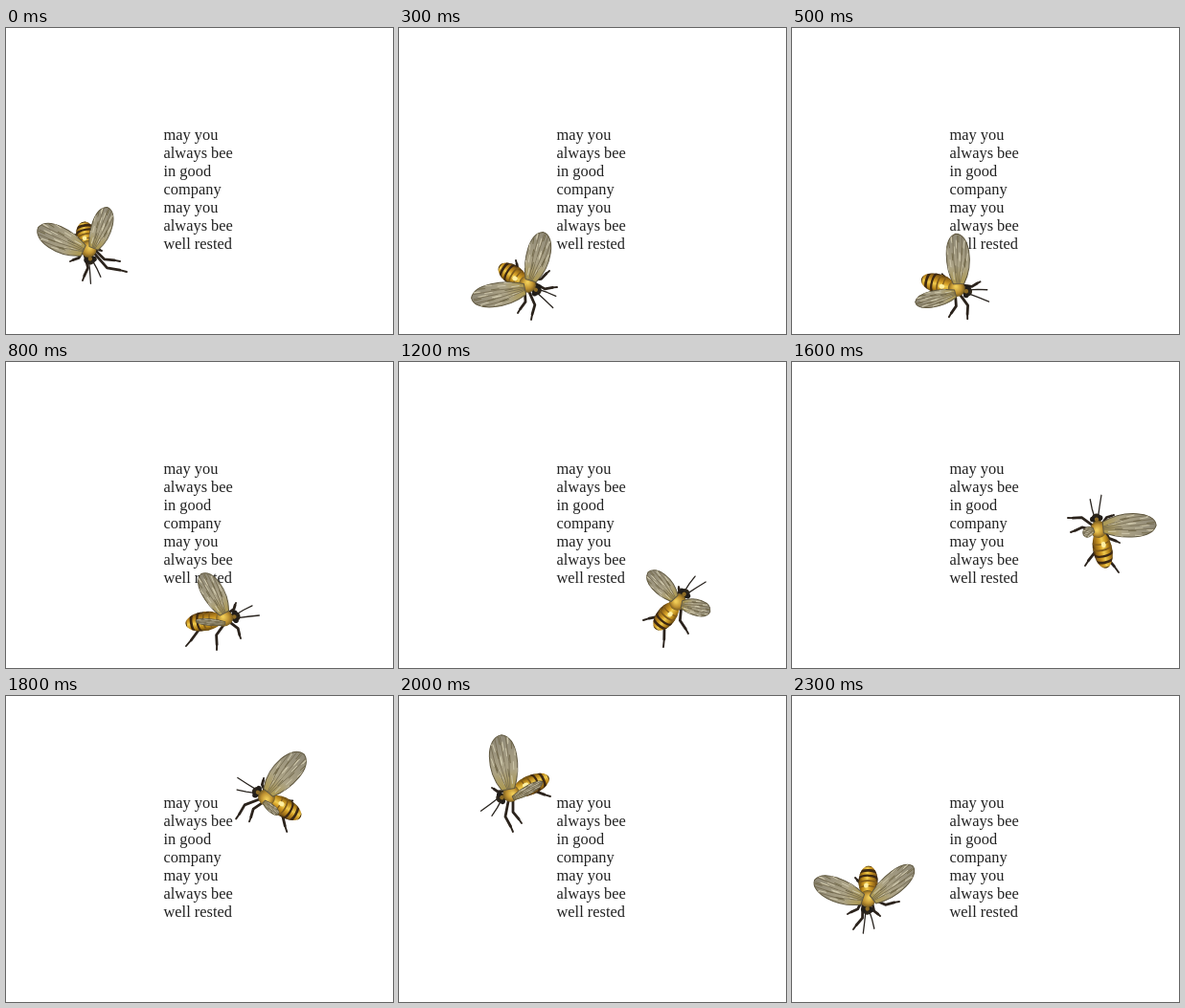
An HTML page with a canvas for the animation above (2400 ms loop, 404 by 320 pixels).

```html
<!DOCTYPE html>
<html lang="en">
<head>
<meta charset="utf-8">
<title>Bee</title>
<style>
html, body { margin: 0; width: 100%; height: 100%; overflow: hidden; background: #fff; }
p, canvas { position: absolute; margin: 0; }
p { left: 164.5px; top: 102px; font: 16.4px/19px "Liberation Serif", "Times New Roman", serif; color: #222; white-space: nowrap; }
canvas { left: 0; top: 0; }
</style>
</head>
<body>
<p>may you<br>always bee<br>in good<br>company<br>may you<br>always bee<br>well rested</p>
<canvas id="c" width="404" height="320"></canvas>
<script>
const ctx = document.getElementById('c').getContext('2d');
const STEPS = 24, STEP_MS = 100, RAD = Math.PI / 180;

// thorax path: step, x, y
const path = [
  [0, 86, 231], [3, 134, 268], [6, 191, 272], [8, 228, 268], [12, 291, 251], [16, 320, 175],
  [18, 272, 106], [19, 198, 80], [20, 117, 102], [22, 79, 176], [23, 79, 212]
];
// heading on top of an even anticlockwise turn: step, degrees
const lean = [[0, 74], [3, 77], [8, 102], [12, 136], [16, 147], [20, 72], [23, 70]];

// offsets from the thorax; wings are x, y, width (left, right)
const tails = [[-5, -28], [-29, -19], [-40, 6], [-23, 28], [8, 40], [39, -17], [1, -34]];
const wings = [
  [21, -43, 19, -53, -21, 23], [18, -54, 22, -58, 16, 22], [-23, -47, 20, -30, 3, 6],
  [-30, -32, 18, 34, 9, 15], [-16, 5, 9, 60, -6, 22], [33, -12, 8, -12, -61, 26],
  [48, -33, 20, -56, -18, 22]
];
// feet: front, middle, hind on the left, then on the right
const feet = [
  [40, 24, 33, 13, 14, 2, -6, 33, -19, 13, -14, -15],
  [31, 3, 23, -14, -12, -25, 4, 37, -10, 30, -10, 10],
  [12, -16, 0, -8, -8, -6, 17, 21, -8, 33, -40, 29],
  [1, -16, -8, -4, -36, 19, 24, 3, 11, 33, -15, 47],
  [-32, -12, -29, 3, -14, 38, 16, -15, 22, 14, 21, 45],
  [2, 40, 11, 31, 41, 3, -20, -6, 0, 0, 8, -4],
  [13, 18, 33, 3, 10, -5, -15, 32, -21, 16, -13, -22]
];

const heading = (step, v) => (v - step * 360 / STEPS) * RAD;
const turn = ([x, y], a) => [
  x * Math.cos(a) - y * Math.sin(a),
  x * Math.sin(a) + y * Math.cos(a)
];

// poses stored relative to the heading
const poses = lean.map(([step, deg], i) => {
  const a = -heading(step, deg), w = wings[i], f = feet[i], row = [step, deg];
  row.push(...turn(tails[i], a));
  for (const k of [0, 3]) row.push(...turn([w[k], w[k + 1]], a), w[k + 2]);
  for (let k = 0; k < 12; k += 2) row.push(...turn([f[k], f[k + 1]], a));
  return row;
});

// periodic cubic through rows of [step, ...values]
function sample(rows, s) {
  const n = rows.length;
  const key = i => rows[(i + n) % n];
  const when = i => key(i)[0] + Math.floor(i / n) * STEPS;
  let i = n - 1;
  while (rows[i][0] > s) i--;
  const h = when(i + 1) - when(i), u = (s - when(i)) / h;
  const slope = (j, k) => (key(j + 1)[k] - key(j - 1)[k]) / (when(j + 1) - when(j - 1));
  const b = u * u * (3 - 2 * u);
  return key(i).slice(1).map((v, j) => {
    const k = j + 1;
    return v * (1 - b) + key(i + 1)[k] * b
      + h * u * (1 - u) * ((1 - u) * slope(i, k) - u * slope(i + 1, k));
  });
}

function line(points, width, color) {
  ctx.beginPath();
  points.forEach(p => ctx.lineTo(p[0], p[1]));
  ctx.lineWidth = width;
  ctx.strokeStyle = color;
  ctx.stroke();
}

function oval(x, y, rx, ry, fill) {
  ctx.beginPath();
  ctx.ellipse(x, y, rx, ry, 0, 0, 7);
  ctx.fillStyle = fill;
  ctx.fill();
}

function leg(hip, foot, side) {
  const dx = foot[0] - hip[0], dy = foot[1] - hip[1];
  const bend = 0.17 * side * (foot[0] < -4 ? -1 : 1);
  const knee = [hip[0] + dx * 0.5 + dy * bend, hip[1] + dy * 0.5 - dx * bend];
  const ankle = [hip[0] + dx * 0.82 + dy * bend * 0.3, hip[1] + dy * 0.82 - dx * bend * 0.3];
  line([hip, knee, ankle], 2.8, '#2b231c');
  line([ankle, foot], 1.9, '#2b231c');
}

function abdomen(tx, ty) {
  const len = Math.hypot(tx, ty), rx = len * 0.48, ry = 10;
  ctx.save();
  ctx.rotate(Math.atan2(ty, tx));
  ctx.translate(len * 0.53, 0);
  const g = ctx.createLinearGradient(0, -ry, 0, ry);
  [[0, '#59400f'], [0.2, '#b98619'], [0.45, '#f0cb4e'], [0.6, '#d39d25'], [0.85, '#936616'], [1, '#392611']]
    .forEach(([at, c]) => g.addColorStop(at, c));
  oval(0, 0, rx, ry, g);
  ctx.clip();
  for (let i = 0; i < 5; i++) {
    const x = rx * (0.98 - i * 0.33);
    ctx.beginPath();
    ctx.ellipse(x - 3, 0, 4, ry, 0, -1.5, 1.5);
    ctx.lineWidth = 3.2 - i * 0.48;
    ctx.strokeStyle = i < 3 ? '#3d2812' : '#805b1a';
    ctx.stroke();
  }
  oval(-rx * 0.25, -2, rx * 0.16, 2.4, '#fff0a2');
  ctx.restore();
}

function wing(root, tx, ty, w, side) {
  const dx = tx - root[0], dy = ty - root[1], len = Math.hypot(dx, dy);
  ctx.save();
  ctx.translate(root[0], root[1]);
  ctx.rotate(Math.atan2(dy, dx));
  ctx.scale(1, side);
  ctx.beginPath();
  ctx.moveTo(0, -w * 0.22);
  ctx.bezierCurveTo(len * 0.35, -w * 0.6, len * 0.9, -w * 0.72, len, -w * 0.08);
  ctx.bezierCurveTo(len, w * 0.6, len * 0.4, w * 0.8, 0, w * 0.3);
  ctx.closePath();
  const g = ctx.createLinearGradient(0, 0, len, 0);
  g.addColorStop(0, '#ac984f');
  g.addColorStop(0.35, '#aca386');
  g.addColorStop(1, '#8f8977');
  ctx.fillStyle = g;
  ctx.fill();
  ctx.lineWidth = 1;
  ctx.strokeStyle = '#5f573f';
  ctx.stroke();
  ctx.clip();
  for (let i = 0; i < 26; i++) {
    const x = len * (0.08 + (i * 0.37 % 0.86)), y = w * ((i * 0.618 % 1) - 0.5);
    line([[x, y], [x + len * 0.14, y * 1.12]], 0.9, i % 3 ? '#d0c9ad' : '#716848');
  }
  for (let i = -1; i < 3; i++) {
    line([[0, i], [len * 0.5, w * i * 0.19], [len * 0.96, w * i * 0.22]], 0.7, '#70664c');
  }
  ctx.restore();
}

function bee(step) {
  const [x, y] = sample(path, step);
  const p = sample(poses, step);
  const tx = p[1], ty = p[2], len = Math.hypot(tx, ty);
  const fx = -tx / len, fy = -ty / len;
  const at = (ahead, side) => [fx * ahead - fy * side, fy * ahead + fx * side];

  ctx.save();
  ctx.translate(x, y);
  ctx.rotate(heading(step, p[0]));
  ctx.lineCap = ctx.lineJoin = 'round';

  for (let i = 0; i < 6; i++) {
    const side = i < 3 ? -1 : 1;
    leg(at(5 - (i % 3) * 5, side * 5), [p[9 + i * 2], p[10 + i * 2]], side);
  }

  abdomen(tx, ty);

  const [hx, hy] = at(11.5, 0);
  oval(hx, hy, 5.2, 5.2, '#2c2519');
  const g = ctx.createRadialGradient(-1, -2, 1, 0, 0, 9.5);
  g.addColorStop(0, '#efcc57');
  g.addColorStop(0.55, '#bd9030');
  g.addColorStop(1, '#66501f');
  oval(0, 0, 9, 8.5, g);

  wing(at(0, -5), p[3], p[4], p[5], 1);
  wing(at(0, 5), p[6], p[7], p[8], -1);

  for (const s of [-1, 1]) {
    const [ex, ey] = at(11.5, s * 4);
    oval(ex, ey, 2.8, 2.8, '#211d19');
    const a = s * 15 * RAD, r = s < 0 ? 21 : 25;
    const tip = [hx + r * Math.cos(a), hy + r * Math.sin(a)];
    line([[hx + 2, hy + s * 2], [hx + r * 0.5, hy + s * 4], tip], 1.3, '#29241f');
  }
  oval(...at(10.5, 0), 2.2, 2.2, '#8e6c25');
  ctx.restore();
}

function draw(now) {
  ctx.clearRect(0, 0, 404, 320);
  bee(Math.floor(now / STEP_MS) % STEPS);
  requestAnimationFrame(draw);
}
draw(performance.now());
</script>
</body>
</html>
```
